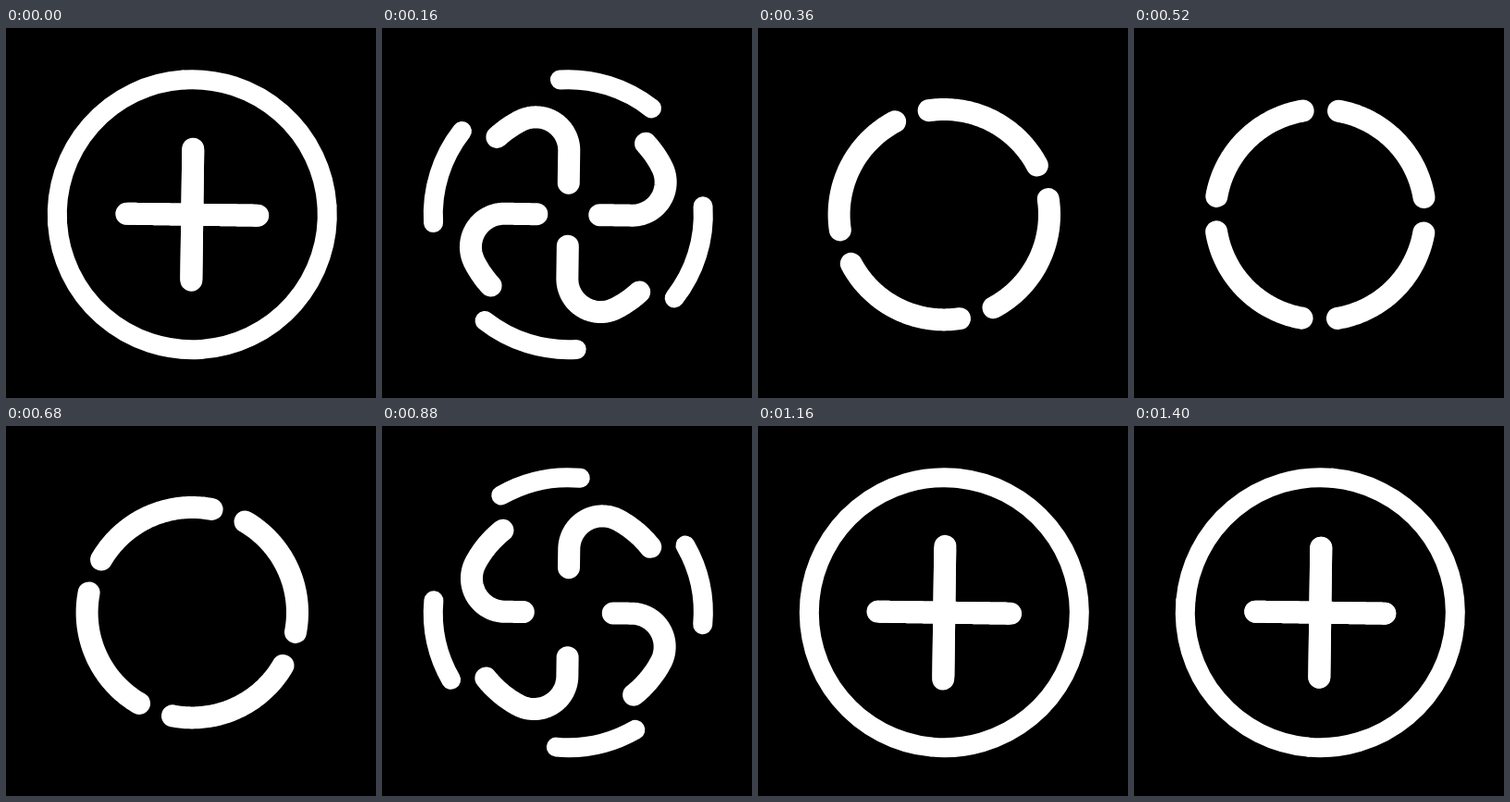
Recreate the animation shown at these times as an HTML page with a canvas. Size 400 px wide and 400 px high, loop 1520 ms.

```html
<!DOCTYPE html>
<html lang="en">
<head>
<meta charset="utf-8">
<title>Plus to ring</title>
<style>
  html, body { margin: 0; width: 100%; height: 100%; overflow: hidden; background: #000; }
  canvas { display: block; width: 100vw; height: 100vh; }
</style>
</head>
<body>
<canvas id="stage" width="400" height="400"></canvas>
<script>
const ctx = document.getElementById("stage").getContext("2d");

const LOOP = 1520, STEP = 40;
const CENTER = { x: 201.3, y: 201.7 };
const TILT = 0.8 * Math.PI / 180;

// Inner strands: straight spoke, rounded corner, then the small ring
const HALF = 70, STRAND_WIDTH = 24;
const RING = 113.7, CORNER = 36;
const SPOKE = Math.sqrt(RING * RING - 2 * RING * CORNER);
const JOIN_ANGLE = Math.atan2(CORNER, SPOKE);
const JOIN = SPOKE + CORNER * (Math.PI / 2 + JOIN_ANGLE);
const TOTAL = 2 * JOIN + RING * (3.5 * Math.PI - 2 * JOIN_ANGLE);

// Outer ring, four quarters
const OUTER = 146, OUTER_WIDTH = 21;
const OUTER_START = 4.3 * Math.PI / 180;
const GAP_RATE = 0.465 * Math.PI / 180;

// Time and distance travelled along the path
const KEYS = [
  [-40, 0], [0, 1], [160, 104], [360, 393.5], [680, TOTAL - 395],
  [880, TOTAL - 118.5], [1000, TOTAL - 48], [1120, TOTAL - 2.5], [1400, TOTAL]
];

const slope = i => (KEYS[i + 1][1] - KEYS[i][1]) / (KEYS[i + 1][0] - KEYS[i][0]);

// Harmonic mean of neighbouring slopes keeps the curve monotone
function tangent(i) {
  if (i === 0 || i === KEYS.length - 1) return 0;
  const a = slope(i - 1), b = slope(i);
  return 2 * a * b / (a + b);
}

function travelled(t) {
  if (t >= 1400) return TOTAL;
  let i = 0;
  while (t >= KEYS[i + 1][0]) i++;
  const [t0, s0] = KEYS[i], [t1, s1] = KEYS[i + 1];
  const h = t1 - t0, u = (t - t0) / h, v = 1 - u;
  return s0 * v * v * (1 + 2 * u) + s1 * u * u * (1 + 2 * v)
    + h * u * v * (v * tangent(i) - u * tangent(i + 1));
}

function pathPoint(p) {
  if (p < SPOKE) return [0, -p];
  if (p < JOIN) {
    const a = (p - SPOKE) / CORNER;
    return [CORNER * (Math.cos(a) - 1), -SPOKE - CORNER * Math.sin(a)];
  }
  const a = JOIN_ANGLE + (p - JOIN) / RING;
  return [-RING * Math.sin(a), -RING * Math.cos(a)];
}

function drawStrand(offset) {
  ctx.lineWidth = STRAND_WIDTH;
  ctx.beginPath();
  for (let d = -HALF; d <= HALF; d += 2) ctx.lineTo(...pathPoint(offset + d));
  ctx.stroke();
}

function drawOuter(offset) {
  const sweep = Math.PI / 2 - offset * GAP_RATE;
  if (sweep <= 0) return;
  ctx.lineWidth = OUTER_WIDTH;
  ctx.beginPath();
  ctx.arc(0, 0, OUTER, -OUTER_START, sweep - OUTER_START);
  ctx.stroke();
}

function draw(t) {
  const s = travelled(t);
  const leaving = s < TOTAL / 2;
  const offset = leaving ? s : TOTAL - s;

  ctx.setTransform(1, 0, 0, 1, 0, 0);
  ctx.fillStyle = "#000";
  ctx.fillRect(0, 0, 400, 400);
  ctx.strokeStyle = "#fff";
  ctx.lineCap = ctx.lineJoin = "round";
  ctx.translate(CENTER.x, CENTER.y);
  ctx.rotate(TILT);
  if (!leaving) ctx.scale(-1, 1);
  for (let i = 0; i < 4; i++) {
    drawStrand(offset);
    drawOuter(offset);
    ctx.rotate(Math.PI / 2);
  }
}

const begin = performance.now();
function tick() {
  const t = (performance.now() - begin) % LOOP;
  draw(Math.floor(t / STEP) * STEP);
  requestAnimationFrame(tick);
}
tick();
</script>
</body>
</html>
```
